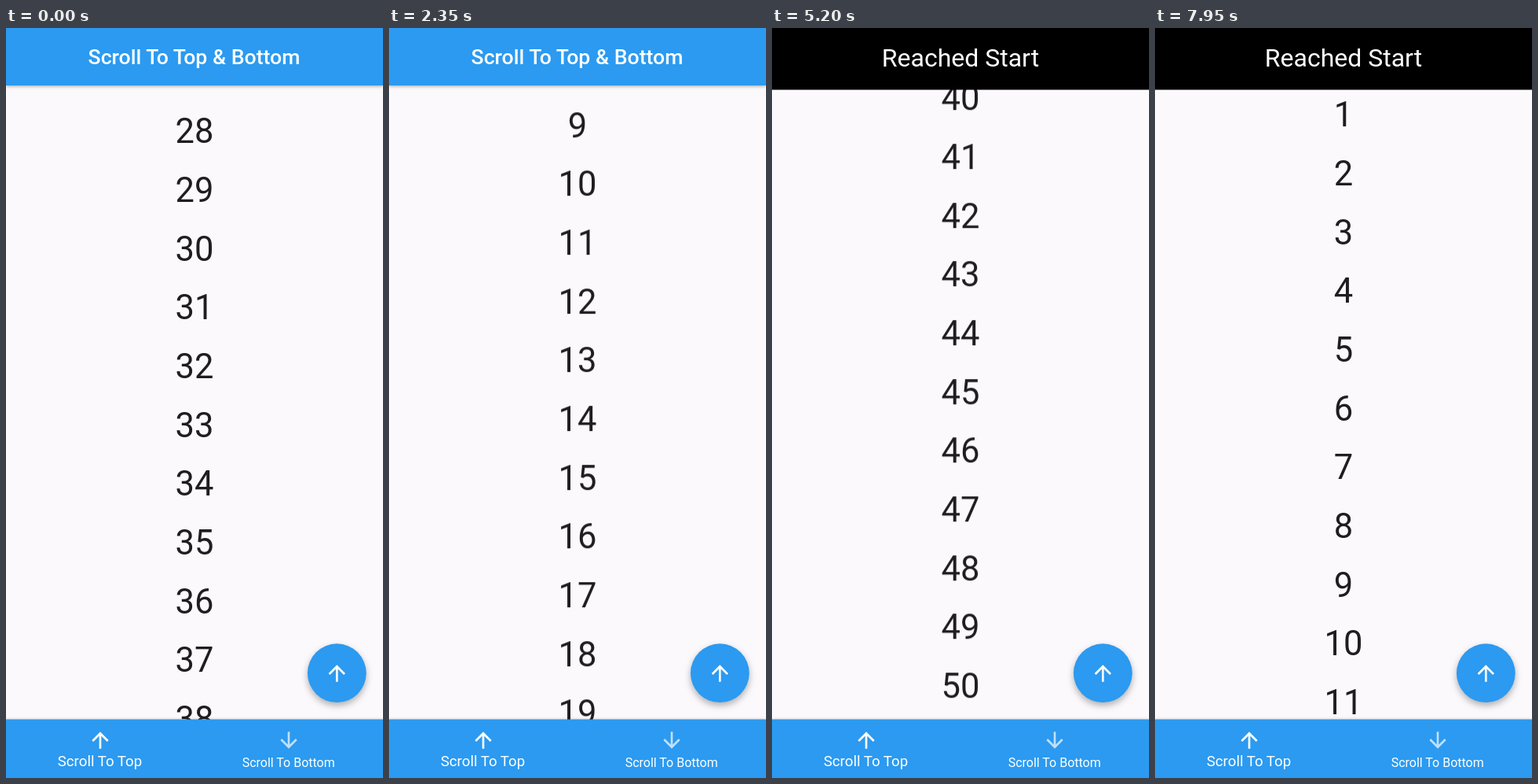
An HTML page that plays this animation: 480x953 px, repeating every 8000 ms.

```html
<!DOCTYPE html>
<html lang="en">
<head>
<meta charset="utf-8">
<title>Scroll To Top &amp; Bottom</title>
<style>
html, body { margin: 0; width: 100%; height: 100%; overflow: hidden; background: #fbf9fc; }
svg { display: block; width: 480px; height: 953px; }
text { font-family: Roboto, sans-serif; text-anchor: middle; fill: #fff; }
#list text { font-size: 43.5px; fill: #1f1d22; }
.bar { fill: #2b9af0; }
.shade { filter: drop-shadow(0 1px 2px rgba(0, 0, 0, .35)); }
.fab { filter: drop-shadow(0 4px 4px rgba(0, 0, 0, .3)); }
.title { font-size: 26.67px; font-weight: 500; }
.note { font-size: 32px; }
</style>
</head>
<body>
<svg viewBox="0 0 480 953">
  <defs>
    <path id="arrow" d="M-8 0l1.41 1.41L-1 -4.17V8h2V-4.17l5.58 5.59L8 0 0 -8z" fill="#fff"/>
  </defs>
  <g id="list"></g>
  <g id="app">
    <rect class="bar shade" width="480" height="73"/>
    <text class="title" x="239.5" y="46">Scroll To Top &amp; Bottom</text>
  </g>
  <g id="black"><rect width="480" height="78.5"/></g>
  <text class="note" id="start" x="240" y="49">Reached Start</text>
  <text class="note" id="end" x="240" y="49">Reached End</text>
  <circle class="bar fab" cx="421.3" cy="819.7" r="37.4"/>
  <use href="#arrow" transform="translate(421.3 820) scale(1.333)"/>
  <rect class="bar shade" y="878.5" width="480" height="75"/>
  <use href="#arrow" transform="translate(120 905) scale(1.333)"/>
  <use href="#arrow" transform="translate(360 905) scale(1.333 -1.333)" opacity=".7"/>
  <text x="119.5" y="938" font-size="18.67">Scroll To Top</text>
  <text x="359.7" y="939" font-size="16">Scroll To Bottom</text>
</svg>
<script>
const LOOP = 8000, PITCH = 224 / 3;
const TOP = -35.3, BOTTOM = 2897.5, MID = 1959.7;
const $ = id => document.getElementById(id);

for (let n = 1; n <= 50; n++) {
  const t = document.createElementNS('http://www.w3.org/2000/svg', 'text');
  t.setAttribute('x', 240);
  t.setAttribute('y', n * PITCH + 15.5);
  t.textContent = n;
  $('list').append(t);
}

const play = (id, frames) => $(id).animate(frames, { duration: LOOP, iterations: Infinity });

// time in ms, scroll offset, easing towards the next row
const scroll = [
  [0, MID],
  [1540, MID, 'ease-in'],
  [2540, TOP],
  [3500, TOP],
  [3550, TOP + 5, 'cubic-bezier(.2,0,.7,.8)'],
  [4290, BOTTOM, 'ease-out'],
  [4350, BOTTOM + 157, 'cubic-bezier(.3,0,.4,1)'],
  [4600, BOTTOM],
  [5750, BOTTOM, 'ease-in'],
  [6750, TOP],
  [LOOP, TOP]
];
play('list', scroll.map(([t, y, easing = 'linear']) =>
  ({ offset: t / LOOP, transform: `translateY(${-y}px)`, easing })));

// hard switches: time in ms, visible or not
const show = (id, steps) => play(id, [...steps, [LOOP, steps.at(-1)[1]]].map(([t, opacity]) =>
  ({ offset: t / LOOP, opacity, easing: 'step-end' })));
show('app', [[0, 1], [2540, 0]]);
show('black', [[0, 0], [2540, 1]]);
show('start', [[0, 0], [2540, 1], [5250, 0], [6750, 1]]);
show('end', [[0, 0], [5250, 1], [6750, 0]]);
</script>
</body>
</html>
```
